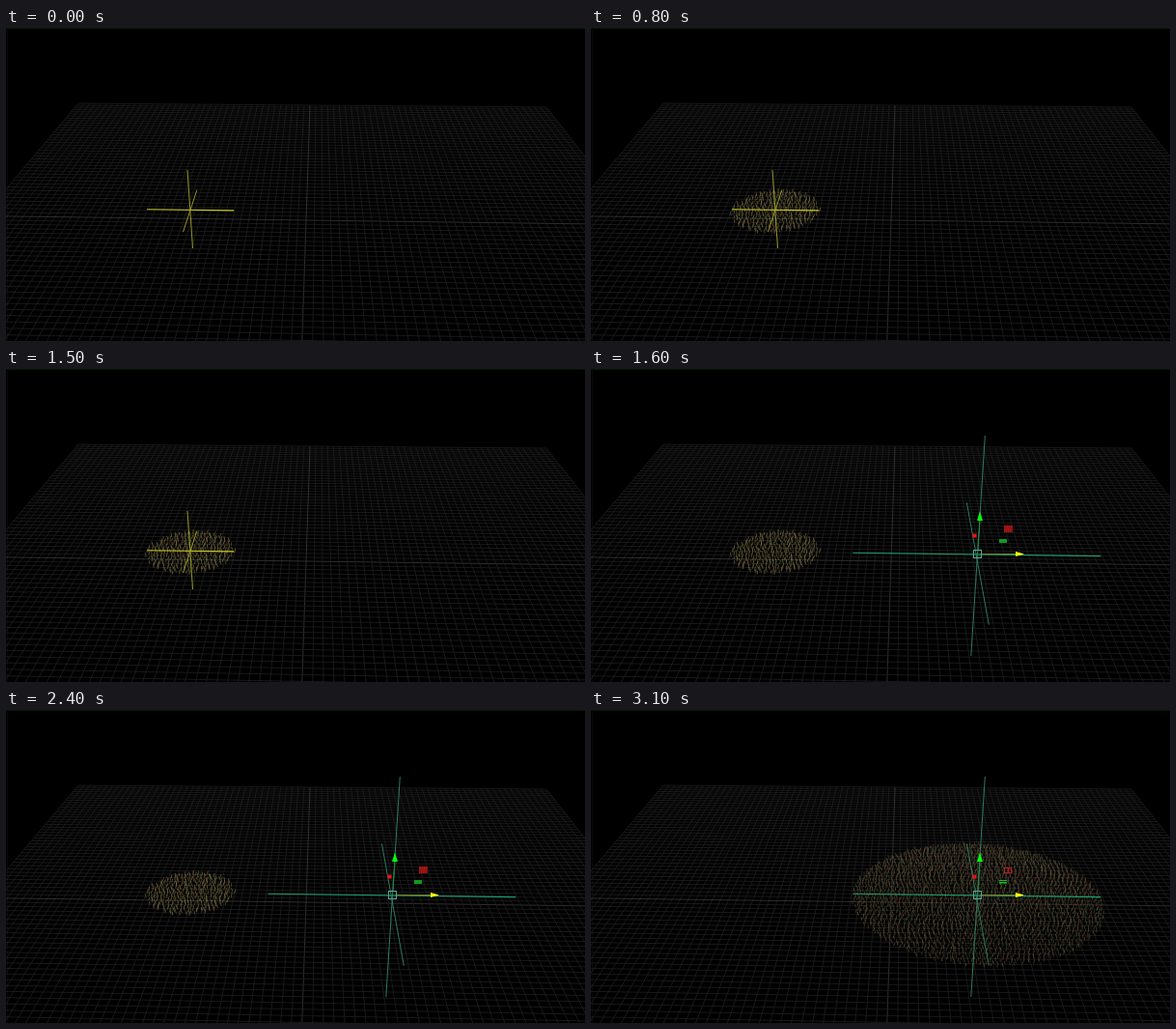
An HTML page with a canvas that plays this animation: 600 px wide and 324 px high, repeating every 4200 ms.

```html
<!DOCTYPE html>
<html lang="en">
<head>
<meta charset="utf-8">
<title>Grass patch on a grid</title>
<style>
html, body { margin: 0; height: 100%; overflow: hidden; background: #000; }
canvas { display: block; }
</style>
</head>
<body>
<canvas id="stage" width="600" height="324"></canvas>
<script>
const ctx = document.getElementById('stage').getContext('2d');
const LOOP = 4200, CELLS = 40, GOLDEN_ANGLE = Math.PI * (3 - Math.sqrt(5));
const small = {
  u: -0.364, v: -0.056, r: 0.137, blades: 330, seed: 7,
  colors: ['#7c6c3c', '#5f6634', '#705638', '#857a48']
};
const large = {
  u: 0.263, v: -0.05, r: 0.383, blades: 2500, seed: 21,
  colors: ['#5e4e32', '#40502c', '#5c3e2c', '#6c5c42', '#4a4228']
};

// Perspective view of the ground plane; u runs right, v towards the viewer.
function project(u, v) {
  const w = 1 - 0.0144 * u - 0.4 * v;
  return [(335 * u - 130 * v + 311) / w, (1.65 * u + 87 * v + 199) / w];
}

function line(a, b, color, width = 1) {
  ctx.strokeStyle = color;
  ctx.lineWidth = width;
  ctx.beginPath();
  ctx.moveTo(...a);
  ctx.lineTo(...b);
  ctx.stroke();
}

function triangle(points, color) {
  ctx.fillStyle = color;
  ctx.beginPath();
  points.forEach(p => ctx.lineTo(...p));
  ctx.fill();
}

function rect(x, y, w, h, color) {
  ctx.fillStyle = color;
  ctx.fillRect(x, y, w, h);
}

function seeded(seed) {
  return () => (seed = (seed * 16807) % 2147483647) / 2147483647;
}

function drawGrid() {
  rect(0, 0, 600, 324, '#000');
  rect(0, 0, 600, 1, '#021802');
  rect(1, 0, 1, 324, '#020c02');
  for (let i = -CELLS; i <= CELLS; i++) {
    const s = i / CELLS, color = i ? '#201f21' : '#3a3a3c';
    line(project(s, -1), project(s, 1), color, 0.8);
    line(project(-1, s), project(1, s), color, 0.8);
  }
}

// Blades are spread evenly over the disc, then nudged a little.
function drawPatch({ u, v, r, blades, seed, colors }) {
  const random = seeded(seed * 7919);
  for (let i = 0; i < blades; i++) {
    const angle = i * GOLDEN_ANGLE, d = r * Math.sqrt((i + 0.5) / blades);
    const [x, y] = project(u + d * Math.cos(angle), v + d * Math.sin(angle));
    const foot = x + random() * 2 - 1, lean = random() * 3 - 1.5;
    const color = colors[Math.floor(random() * colors.length)];
    line([foot, y + 2], [foot + lean, y - 1 - random() * 1.5], color, 0.7);
  }
}

function drawLocator({ u, v, r }, top, bottom, color, thin) {
  line(project(u - r, v), project(u + r, v), color, 1.1);
  line(project(u, v - r), project(u, v + r), thin, 0.9);
  line(top, bottom, thin, 0.9);
}

function drawHandles(outlined) {
  line([401, 187], [403, 157], '#208840');
  triangle([[403, 147.5], [400, 157], [406, 157]], '#00ff10');
  line([405, 191.5], [441, 191.5], '#787818');
  triangle([[449, 191.5], [440, 189], [440, 194]], '#ffff00');
  rect(395.5, 170.5, 4, 4, '#f01010');
  ctx.lineWidth = 1;
  ctx.strokeStyle = '#58a898';
  ctx.strokeRect(396.5, 187.5, 8, 8);
  if (outlined) {
    ctx.strokeStyle = '#c01818';
    ctx.strokeRect(428.5, 163.5, 7, 5);
    rect(432, 164, 1, 5, '#c01818');
    rect(423, 176, 8, 1, '#10c020');
    rect(423, 178, 8, 1.5, '#10c020');
  } else {
    rect(428, 162, 9, 7, '#801010');
    for (let x = 429; x < 437; x += 2) line([x + 0.5, 162], [x - 0.5, 169], '#b81818');
    rect(423, 176, 8, 4, '#109820');
  }
}

const drawSmallLocator = () =>
  drawLocator(small, [188, 147], [193.5, 228], '#c8c820', '#a8a828');

function drawLargeLocator(outlined) {
  drawLocator(large, [408.3, 69], [393.8, 297], '#20a070', '#348868');
  drawHandles(outlined);
}

const scenes = [
  { start: 0, draw() { drawSmallLocator(); } },
  { start: 800, draw() { drawPatch(small); drawSmallLocator(); } },
  { start: 1600, draw() { drawPatch(small); drawLargeLocator(false); } },
  { start: 2500, draw() { drawPatch(large); drawLargeLocator(true); } }
];

const began = performance.now();
let shown;
function render() {
  const t = (performance.now() - began) % LOOP;
  const scene = scenes.findLast(s => t >= s.start);
  if (scene !== shown) {
    shown = scene;
    drawGrid();
    scene.draw();
  }
  requestAnimationFrame(render);
}
render();
</script>
</body>
</html>
```
